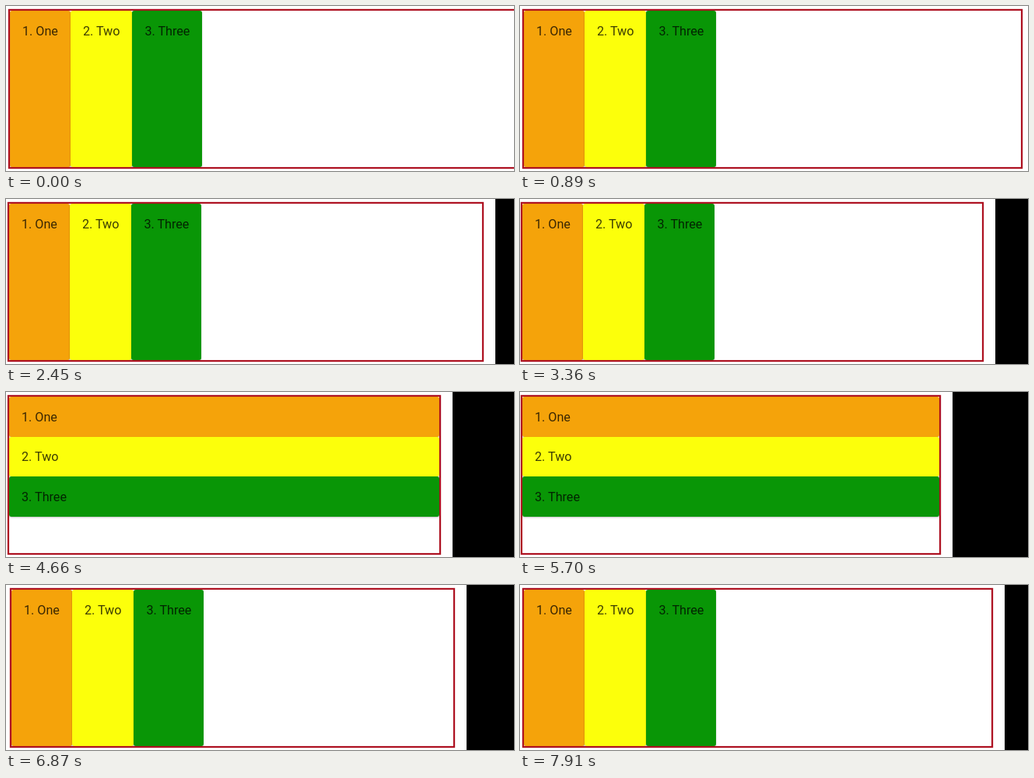
An HTML page that plays this animation: 653 by 213 pixels, repeating every 8000 ms.

```html
<!DOCTYPE html>
<html lang="en">
<head>
<meta charset="utf-8">
<title>Responsive flex cards</title>
<style>
  html, body { margin: 0; width: 100%; height: 100%; overflow: hidden; background: #000; }
  #page { position: absolute; top: 0; left: 0; height: 213px; background: #fff; }
  #box { position: absolute; top: 6px; height: 202px; display: flex; }
  #box.column { flex-direction: column; }
  #box::after {
    content: ""; position: absolute; inset: -2px;
    border: 2px solid #ae1222;
    box-shadow: 0 0 1px #ae1222, inset 0 0 1px #ae1222;
  }
  .card {
    flex: none; padding: 16.5px 16px 15.5px; border-radius: 3px;
    font: 16.15px/19.5px Roboto, sans-serif; white-space: nowrap;
    color: rgba(0, 0, 0, .76);
    box-shadow: 0 1px 2px rgba(0, 0, 0, .25);
  }
  .orange { background: #f5a30a; }
  .yellow { background: #fcff0b; }
  .green { background: #099606; }
</style>
</head>
<body>
<div id="page">
  <div id="box">
    <div class="card orange">1. One</div>
    <div class="card yellow">2. Two</div>
    <div class="card green">3. Three</div>
  </div>
</div>
<script>
  const LOOP = 8000, HOLD = 500, STEP = 130, BREAKPOINT = 582;
  const page = document.getElementById('page');
  const box = document.getElementById('box');

  // Progress from 0 to 1 between two times
  const ramp = (t, from, to) => Math.min(1, Math.max(0, (t - from) / (to - from)));

  // The window is dragged narrower in two pulls, then eased wider again
  const edgeAt = t => 671
    - 60 * ramp(t, 370, 3360) - 13 * ramp(t, 3360, 3880)
    - 24 * ramp(t, 4400, 4660) - 18 * ramp(t, 4660, 5310)
    + 67 * ramp(t, 6090, 7910) ** 0.74;

  // The page sways slightly with the drag
  const driftAt = t => -2 * ramp(t, 1280, 3360)
    + ramp(t, 3880, 4660) - ramp(t, 4660, 5310)
    + 4 * ramp(t, 5960, 6870) - 2 * ramp(t, 6870, 7910);

  function draw(now) {
    const t = now % LOOP;
    const tick = t < HOLD ? 0 : HOLD + Math.floor((t - HOLD) / STEP) * STEP;
    const edge = Math.round(edgeAt(tick));
    const left = 5 + Math.round(driftAt(tick));
    page.style.width = edge + 'px';
    box.style.left = left + 'px';
    box.style.width = edge - 17 - left + 'px';
    box.classList.toggle('column', edge < BREAKPOINT);
    requestAnimationFrame(draw);
  }
  draw(performance.now());
</script>
</body>
</html>
```
